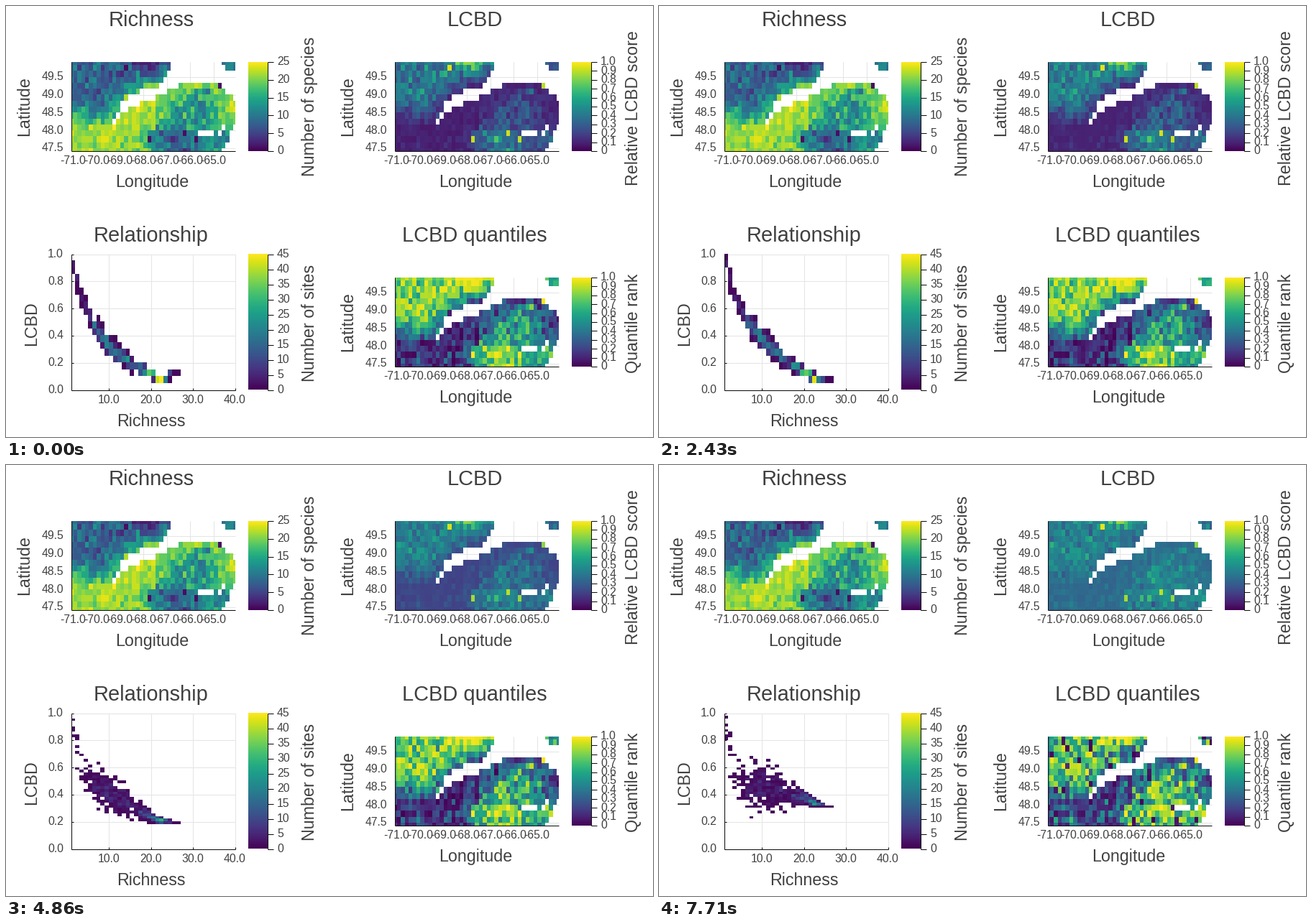
A matplotlib script for the animation above (7.85 s loop, 900 px wide and 600 px high).

```python
import matplotlib.pyplot as plt
import numpy as np
from matplotlib.animation import FuncAnimation
from matplotlib.patches import Rectangle

plt.rcParams["font.family"] = "Liberation Sans"

W, H, DPI = 900, 600, 100
FRAMES, LOOP = 55, 7850
ROWS, COLS = 16, 43
MAP_W, MAP_H = 228, 124
INK, LINE, GRID = "#404040", "#101010", "#e5e5e5"
rng = np.random.default_rng(7)

fig = plt.figure(figsize=(W / DPI, H / DPI), dpi=DPI, facecolor="white")
ax = fig.add_axes([0, 0, 1, 1])
ax.axis("off")


# ---- model -------------------------------------------------------------

def land_mask():
    """True on land; water spans are (row, first column, end column)."""
    land = np.ones((ROWS, COLS), bool)
    water = [
        (0, 26, 39), (1, 26, 40), (2, 25, 43), (3, 24, 43),
        (4, 23, 28), (4, 39, 43), (5, 18, 25), (5, 40, 43),
        (6, 15, 22), (6, 42, 43), (7, 13, 18), (8, 13, 15),
        (9, 12, 13), (10, 11, 12), (11, 39, 40), (11, 42, 43),
        (12, 33, 37), (12, 38, 39), (12, 41, 43), (13, 41, 43),
        (14, 40, 43), (15, 39, 43),
    ]
    for row, a, b in water:
        land[row, a:b] = False
    return land


def richness_map():
    coarse = np.array([
        [8, 8, 9, 9, 4, 5, 6, 9, 9, 8, 13],
        [9, 7, 6, 9, 8, 5, 16, 18, 18, 18, 12],
        [8, 10, 8, 9, 15, 22, 20, 20, 20, 22, 20],
        [7, 7, 9, 17, 23, 22, 18, 14, 13, 16, 22],
        [18, 14, 11, 20, 22, 22, 15, 12, 12, 19, 22],
        [22, 21, 22, 23, 22, 20, 13, 15, 16, 19, 18],
        [21, 21, 22, 22, 22, 9, 6, 8, 11, 10, 12],
        [21, 22, 21, 22, 19, 13, 8, 8, 12, 16, 16],
    ])
    n, m = coarse.shape
    wide = np.array([np.interp(np.linspace(0, m - 1, COLS), range(m), r)
                     for r in coarse])
    base = np.array([np.interp(np.linspace(0, n - 1, ROWS), range(n), c)
                     for c in wide.T]).T
    sd = np.where(base > 19, 1.6, 2.8)
    rich = np.clip(np.rint(base + sd * rng.normal(size=base.shape)), 2, 27)
    for row, col in [(1, 14), (4, 38), (12, 29), (13, 20), (13, 32)]:
        rich[row, col] = 1
    return rich


LAND = land_mask()
RICH = richness_map()
R = RICH[LAND]

row, col = np.mgrid[:ROWS, :COLS]
bump = np.exp(-((col - 31) / 6) ** 2 - ((row - 8) / 2.5) ** 2)
DEV = (0.8 * rng.normal(size=LAND.shape) + 1.1 * bump - 0.3)[LAND]
DEV *= np.clip((24 - R) / 12, 0.1, 1.2)

# Mean score against richness at a few moments
KEYS = [0, 12, 22, 29, 34, 45, 54]
KNOTS = [1, 3, 6, 10, 15, 20, 22, 27]
CURVES = np.array([
    [.90, .70, .48, .31, .19, .11, .075, .15],
    [.92, .72, .51, .36, .21, .11, .08, .10],
    [.90, .70, .52, .37, .23, .13, .108, .10],
    [.88, .66, .51, .40, .29, .20, .175, .155],
    [.84, .62, .50, .41, .32, .23, .21, .19],
    [.82, .61, .49, .45, .40, .34, .31, .275],
    [.83, .61, .48, .465, .42, .38, .345, .305],
])
SPREAD = [.03, .03, .03, .05, .065, .08, .085]


def scores(k):
    curve = [np.interp(k, KEYS, c) for c in CURVES.T]
    s = np.interp(R, KNOTS, curve) + np.interp(k, KEYS, SPREAD) * DEV
    return np.clip(s, 0.05, 0.999)


def on_map(values):
    out = np.full(LAND.shape, np.nan)
    out[LAND] = values
    return out


def ranks(values):
    return np.argsort(np.argsort(values)) / (len(values) - 1)


def site_counts(s, k):
    bins = 20 if k < 19 else 50
    n, _, _ = np.histogram2d(s, R, bins=[bins, 39], range=[[0, 1], [1, 40]])
    return np.where(n > 0, n, np.nan)


# ---- drawing -----------------------------------------------------------

def text(x, y, s, px, **kw):
    ax.text(x, y, s, fontsize=px * 72 / DPI, color=INK, **kw)


def label(x, y, s, px=23.3, turn=0):
    text(x, y, s, px, ha="center", va="baseline", rotation=turn,
         rotation_mode="anchor")


def line(xs, ys, color=LINE, z=3):
    ax.plot(xs, ys, color=color, lw=0.75, zorder=z, solid_capstyle="butt")


def frame(x, y, w, h, xticks, yticks):
    """Grid, spines, inner ticks and tick labels."""
    for px, s in xticks:
        line([px, px], [y, y + h], GRID, 0.5)
        line([px, px], [y + h - 3, y + h], z=0.8)
        text(px, y + h + 14, s, 15.8, ha="center", va="center")
    for py, s in yticks:
        line([x, x + w], [py, py], GRID, 0.5)
        line([x, x + 3], [py, py], z=0.8)
        text(x - 11, py, s, 15.8, ha="right", va="center")
    line([x, x], [y, y + h])
    line([x, x + w], [y + h, y + h])


def colorbar(x, y, h, names, top, title, title_y):
    """names: (value, label) pairs, top: value at the upper end."""
    ax.imshow(np.linspace(1, 0, 256)[:, None], cmap="viridis", aspect="auto",
              extent=(x, x + 27, y + h, y), zorder=1)
    line([x + 27, x + 27], [y, y + h])
    for v, s in names:
        py = y + h * (1 - v / top)
        line([x + 27, x + 35], [py, py])
        text(x + 40, py, s, 15.8, ha="left", va="center")
    label(x + 92, title_y, title, turn=90)


def heat(data, extent, vmax, clip):
    im = ax.imshow(data, cmap="viridis", vmin=0, vmax=vmax, aspect="auto",
                   interpolation="nearest", extent=extent, zorder=1)
    im.set_clip_path(Rectangle(clip[:2], *clip[2:], transform=ax.transData))
    return im


def map_panel(x, y, title, data, vmax):
    label(x + 111, y - 50.5, title, 29)
    xt = [(x + 2.3 + 32.57 * i, f"{i - 71:.1f}") for i in range(7)]
    yt = [(y + 20.8 + 24.8 * i, f"{49.5 - i / 2:.1f}") for i in range(5)]
    frame(x, y, MAP_W, MAP_H, xt, yt)
    label(x + 112, y + 174, "Longitude")
    label(x - 59, y + 62, "Latitude", turn=90)
    dx, dy = MAP_W / (COLS - 1) / 2, MAP_H / (ROWS - 1) / 2
    box = (x - dx, x + MAP_W + dx, y + MAP_H + dy, y - dy)
    return heat(data, box, vmax, (x, y, MAP_W, MAP_H))


def rel_panel(data):
    label(202, 327.5, "Relationship", 29)
    xt = [(143 + 58.5 * i, f"{10 * (i + 1):.1f}") for i in range(4)]
    yt = [(534.5 - 37.8 * i, f"{i / 5:.1f}") for i in range(6)]
    frame(91, 345.5, 228, 189, xt, yt)
    label(202, 585, "Richness")
    label(42, 442, "LCBD", turn=90)
    return heat(data, (90.4, 318.5, 534.5, 345.5), 45, (91, 345, 228, 190))


def steps(top, gap):
    return [(v, str(v)) for v in range(0, top + 1, gap)]


unit = [(0, "0")] + [(i / 10, f"{i / 10:.1f}") for i in range(1, 11)]
first = scores(0)

map_panel(91, 78, "Richness", on_map(R), 25)
colorbar(337, 78, 124, steps(25, 5), 25, "Number of species", 140)
score_im = map_panel(541, 78, "LCBD", on_map(first), 1)
colorbar(787, 78, 124, unit, 1, "Relative LCBD score", 142)
rel_im = rel_panel(site_counts(first, 0)[::-1])
colorbar(337, 345.5, 189, steps(45, 5), 45, "Number of sites", 441)
rank_im = map_panel(541, 378, "LCBD quantiles", on_map(ranks(first)), 1)
colorbar(787, 378, 124, unit, 1, "Quantile rank", 442)

ax.set_xlim(0, W)
ax.set_ylim(H, 0)


def update(k):
    s = scores(k)
    score_im.set_data(on_map(s))
    rank_im.set_data(on_map(ranks(s)))
    rel_im.set_data(site_counts(s, k)[::-1])
    return score_im, rank_im, rel_im


anim = FuncAnimation(fig, update, frames=FRAMES, interval=LOOP / FRAMES,
                     repeat=True, repeat_delay=0)
plt.show()
```
